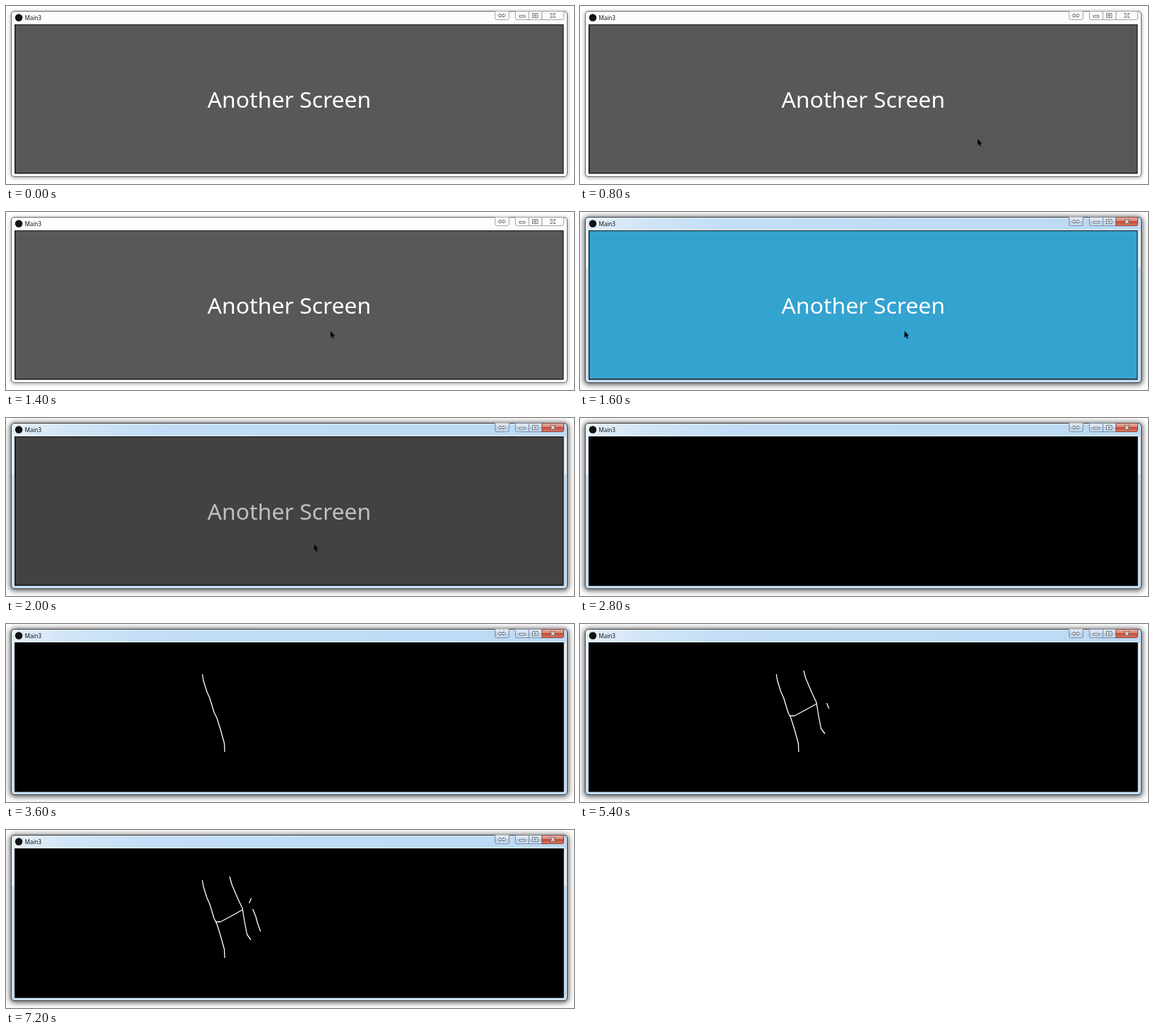
These frames come from a looping animation (800 by 252 pixels, 7.4 s). An HTML page:

```html
<!DOCTYPE html>
<html lang="en">
<head>
<meta charset="utf-8">
<title>Main3</title>
<style>
html, body { margin: 0; width: 100%; height: 100%; overflow: hidden; background: #fff; }
.win {
  position: absolute; left: 7px; top: 6.5px; width: 784px; height: 235.5px;
  box-sizing: border-box; border: 1px solid #6a6a6a; border-radius: 5px;
  background: #fdfdfd; box-shadow: 0 1px 5px 1px rgba(0, 0, 0, .28);
}
.win.live {
  border-color: #3a444f;
  background:
    linear-gradient(90deg, #e6f0fa, #d3e6f7 9%, #c3def6 25%, #bcdaf5) 0 0 / 100% 19px no-repeat,
    linear-gradient(#dfecf9 0 71px, #b9d8f3 72px);
  box-shadow: inset 0 0 0 1px rgba(255, 255, 255, .55), 0 1px 8px 2px rgba(0, 0, 0, .45);
}
svg { position: absolute; left: 0; top: 0; }
.name { font: 8.1px "Open Sans", "Noto Sans", sans-serif; }
.label { font: 31.8px "Noto Sans", "Open Sans", sans-serif; fill: #fff; }
.ink path {
  fill: none; stroke: #fff; stroke-width: 1.3; stroke-linejoin: round;
  stroke-dasharray: 1 2; stroke-dashoffset: 1;
}

/* Everything advances in 200 ms ticks, so each key holds until the next. */
.live, .press, .fade, .cursor, .ink path { animation: 7.4s step-end infinite; }
.live { animation-name: live; }
.press { animation-name: press; }
.fade { animation-name: fade; }
.cursor { animation-name: move; }
.ink .h1 { animation-name: h1; }
.ink .h2 { animation-name: h2; }
.ink .bar { animation-name: bar; }
.ink .stem { animation-name: stem; }
.ink .dot { animation-name: dot; }

@keyframes live { 0% { opacity: 0 } 21.6216%, 100% { opacity: 1 } }
@keyframes press { 0% { opacity: 0 } 21.6216% { opacity: 1 } 27.027%, 100% { opacity: 0 } }
@keyframes fade { 0% { opacity: 0 } 27.027% { opacity: .25 } 29.7297% { opacity: .82 } 32.4324%, 100% { opacity: 1 } }
@keyframes move {
  0% { transform: translate(840px, 270px) }
  5.4054% { transform: translate(762px, 232px) }
  8.1081% { transform: translate(650px, 206px) }
  10.8108% { transform: translate(560px, 188px) }
  13.5135% { transform: translate(498px, 176px) }
  16.2162% { transform: translate(466px, 170px) }
  18.9189% { transform: translate(457px, 168.5px) }
  27.027% { transform: translate(433.5px, 178.5px) }
  29.7297% { transform: translate(349px, 138px) }
  32.4324%, 100% { transform: translate(276px, 71px) }
}
@keyframes h1 {
  0% { stroke-dashoffset: 1 } 43.2432% { stroke-dashoffset: .75 }
  45.9459% { stroke-dashoffset: .35 } 48.6486%, 100% { stroke-dashoffset: 0 }
}
@keyframes h2 {
  0% { stroke-dashoffset: 1 } 51.3513% { stroke-dashoffset: .85 }
  54.054% { stroke-dashoffset: .5 } 56.7567% { stroke-dashoffset: .22 }
  59.4594%, 100% { stroke-dashoffset: 0 }
}
@keyframes bar {
  0% { stroke-dashoffset: 1 } 64.8648% { stroke-dashoffset: .75 }
  67.5675% { stroke-dashoffset: .3 } 70.2702%, 100% { stroke-dashoffset: 0 }
}
@keyframes stem {
  0% { stroke-dashoffset: 1 } 72.9729% { stroke-dashoffset: .75 }
  75.6756% { stroke-dashoffset: .3 } 78.3783%, 100% { stroke-dashoffset: 0 }
}
@keyframes dot {
  0% { stroke-dashoffset: 1 } 81.081% { stroke-dashoffset: .7 }
  83.7837% { stroke-dashoffset: .3 } 86.4864%, 100% { stroke-dashoffset: 0 }
}
</style>
</head>
<body>
<div class="win"></div>
<div class="win live"></div>
<svg width="800" height="252" viewBox="0 0 800 252">
  <defs>
    <linearGradient id="glass" x2="0" y2="1">
      <stop offset="0" stop-color="#e3edf7"/><stop offset=".48" stop-color="#cedded"/>
      <stop offset=".5" stop-color="#b6cadf"/><stop offset="1" stop-color="#cbe0f3"/>
    </linearGradient>
    <linearGradient id="red" x2="0" y2="1">
      <stop offset="0" stop-color="#e8b3a8"/><stop offset=".48" stop-color="#d67d6d"/>
      <stop offset=".5" stop-color="#c14a36"/><stop offset="1" stop-color="#db7a62"/>
    </linearGradient>
    <path id="snap" d="M689 7.5V17q0 2.5 2.5 2.5h14.5q2.5 0 2.5-2.5V7.5"/>
    <path id="pair" d="M755 7.5V19.5H720q-2.5 0-2.5-2.5V7.5z"/>
    <path id="shut" d="M755 7.5H785.5V17q0 2.5-2.5 2.5H755z"/>
    <g id="signs" stroke-width=".9" stroke-linejoin="round">
      <path d="M692.8 13.5l3-2.7v1.6h5v-1.6l3 2.7-3 2.7v-1.6h-5v1.6z"/>
      <rect x="723" y="13.3" width="8" height="2.6"/>
      <path d="M741.5 10.5h7.5v6h-7.5zM743.8 12.6h2.9v1.8h-2.9z"/>
      <path d="M766.5 10.5h2.2l1.5 1.6 1.5-1.6h2.2l-2.4 3 2.4 3h-2.2l-1.5-1.6-1.5 1.6h-2.2l2.4-3z"/>
    </g>
  </defs>

  <g fill="#fdfdfd" stroke="#a3a3a3">
    <use href="#snap"/><use href="#pair"/><use href="#shut"/>
    <path d="M736.5 8v11"/>
    <use href="#signs" stroke="#666"/>
  </g>
  <g class="live" stroke="#7a8da1">
    <use href="#snap" fill="url(#glass)"/>
    <use href="#pair" fill="url(#glass)"/>
    <use href="#shut" fill="url(#red)" stroke="#8d4a45"/>
    <path d="M736.5 8v11"/>
    <use href="#signs" fill="#fff" stroke="#59636f"/>
    <rect x="11.5" y="25.5" width="774.5" height="212.5" fill="none" stroke="#e4f1fc"/>
  </g>

  <circle cx="18" cy="16.5" r="5.2" fill="#111"/>
  <text class="name" x="26.5" y="19.5">Main3</text>

  <rect x="12" y="26" width="773.5" height="211.5" fill="#161616"/>
  <rect x="13.5" y="27" width="770.8" height="209" fill="#585858"/>
  <rect class="press" x="13.5" y="27" width="770.8" height="209" fill="#33a3d0"/>
  <text class="label" x="283.8" y="144">Another Screen</text>
  <path class="cursor" d="M0 0V9.2L2 7.3 3.6 10.8 5.1 10.1 3.6 6.8H6.3Z" fill="#060606"/>
  <rect class="fade" x="12" y="26" width="773.5" height="211.5"/>

  <g class="ink">
    <path class="h1" pathLength="1" d="M276.500 71L278 80 283 96 287 105 293 125 297 133 302 149 307.500 169 308 181"/>
    <path class="h2" pathLength="1" d="M315 66L318 77 326 96 333 111 336 130 339.500 148 345 155.500"/>
    <path class="bar" pathLength="1" d="M296 130H302L317 122 333 113"/>
    <path class="stem" pathLength="1" d="M347.500 112L352 123 354 131 358.500 143.500"/>
    <path class="dot" pathLength="1" d="M345.500 96.500L342.500 103.500"/>
  </g>
</svg>
</body>
</html>
```
